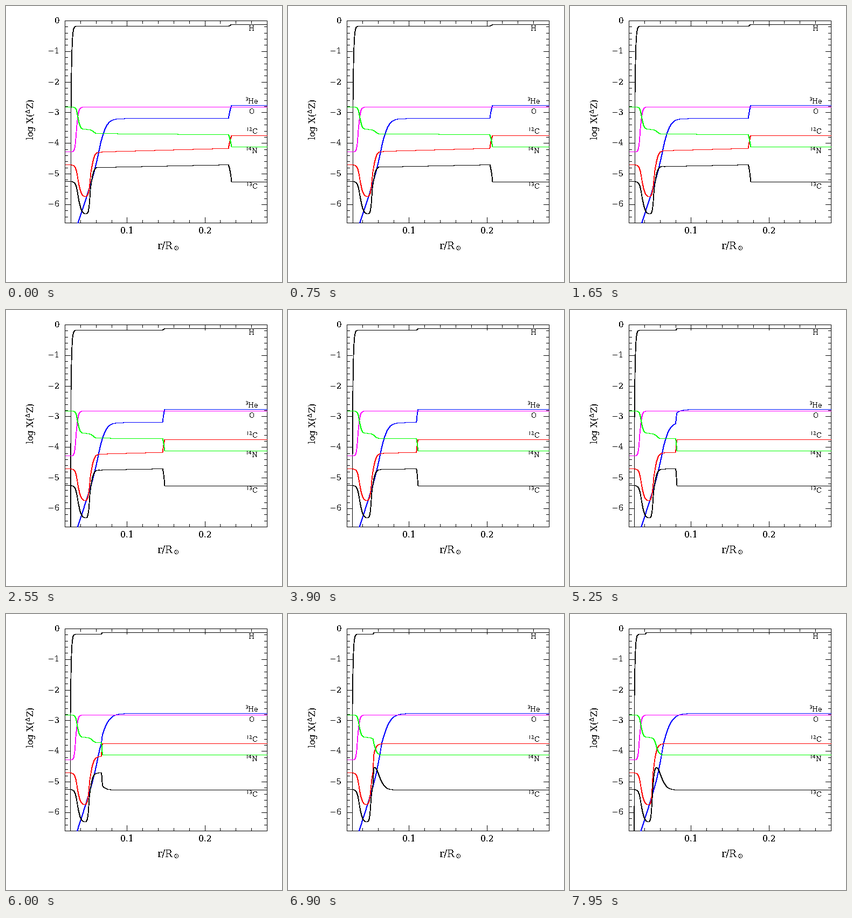
A matplotlib script for the animation above (8 s loop, 512 by 512 pixels).

```python
import numpy as np
import matplotlib.pyplot as plt
from matplotlib.animation import FuncAnimation
from matplotlib.patches import Rectangle

SIZE, DPI = 512, 100
PX = 72 / DPI
LEFT, RIGHT, TOP, BOTTOM = 109, 484, 27, 402
X_UNIT = (RIGHT - LEFT) / 0.26
Y_UNIT = (BOTTOM - TOP) / 6.6
CENTRE = LEFT - 0.02 * X_UNIT          # pixel column of r = 0
STEPS, TICK_MS, TICKS_PER_STEP = 54, 50, 3

plt.rcParams.update({"font.family": "DejaVu Serif",
                     "mathtext.fontset": "dejavuserif",
                     "text.antialiased": False})

xs = np.arange(LEFT + 1, RIGHT + 1)


def rise(u, mid, w_left, w_right):
    """Skewed logistic from 0 to 1 with its own width on each side."""
    d = u - mid
    z = np.where(d < 0, d / w_left, d / w_right)
    return 1 / (1 + np.exp(-np.clip(z, -50, 50)))


# Each profile gives the pixel rows (inside, outside) of the jump.
def hydrogen(u):
    wall = np.exp(np.clip(12 * (120 - u), -50, 8))
    return 37 + 158 * np.exp((120 - u) / 1.45) + wall, np.full(len(u), 34.0)


def helium3(u):
    core = 3 * 4 * np.log1p(np.exp((170 - u) / 4))
    return (208.4 + core + 82.5 * (1 - rise(u, 175.4, 5.2, 6.5)),
            184 + core + 107 * (1 - rise(u, 176.3, 5.2, 8.5)))


def oxygen(u):
    y = 270.3 - 83.3 * rise(u, 130.2, 1.4, 2)
    return y, y


def carbon12(u):
    core = 294.2 + 60 * rise(u, 133.5, 2.3, 3)
    return (core - 90.7 * rise(u, 156.8, 1.9, 3.6),
            core - 114.2 * rise(u, 155.9, 1.3, 3.5))


def nitrogen14(u):
    core = 187 + 41.4 * rise(u, 133.2, 1.7, 2.2)
    return (core + 10 * rise(u, 162, 3, 2.4),
            core + 32.6 * rise(u, 162.6, 2.4, 2.7))


def carbon13(u):
    core = 325 + 61 * rise(u, 133.8, 2.4, 3)
    return (core - 92 * rise(u, 156, 1.4, 3.1),
            core - 110 * rise(u, 155.1, 1.4, 2) + 50 * rise(u, 171.8, 4.5, 5.5))


# profile, colour, tilt of the inner plateau
SPECIES = [(hydrogen, "black", 0), (helium3, "blue", 0), (oxygen, "magenta", 0),
           (carbon12, "red", 0.028), (nitrogen14, "lime", -0.009),
           (carbon13, "black", 0.021)]


def abundance(y):
    return 10 ** ((TOP - y) / Y_UNIT)


def jump_edge(n):
    """Outer edge of the jump: a decay towards r = 0 that slowly speeds up."""
    rate = 0.0235 + 0.000207 * n - 1.35e-8 * n ** 3
    return CENTRE + 337.85 * np.exp(-rate * n)


def curve(profile, tilt, n):
    edge = jump_edge(n)
    width = 0.017 * (edge - CENTRE)
    shrink = 1 - 0.035 * n / (STEPS - 1)
    inner, outer = profile(CENTRE + (xs - CENTRE) / shrink)
    slope = tilt * np.maximum(edge - np.maximum(xs, 175), 0)
    inner = inner + slope * np.interp(xs, [155, 175], [0, 1])
    mix = np.clip((xs - edge + width) / width, 0, 1)
    blend = (1 - mix) * abundance(inner) + mix * abundance(outer)
    return np.round(TOP - Y_UNIT * np.log10(blend))


fig = plt.figure(figsize=(SIZE / DPI, SIZE / DPI), dpi=DPI, facecolor="white")
ax = fig.add_axes([0, 0, 1, 1])
ax.set(xlim=(-0.5, SIZE - 0.5), ylim=(SIZE - 0.5, -0.5))
ax.axis("off")


def stroke(x, y, color="black", width=1.0):
    return ax.plot(x, y, color=color, lw=width * PX, antialiased=False,
                   snap=False)[0]


def label(x, y, text, size, **kw):
    ax.text(x, y, text, fontsize=size * PX, **{"va": "baseline", **kw})


def draw_axes():
    stroke([LEFT, RIGHT, RIGHT, LEFT, LEFT], [TOP, TOP, BOTTOM, BOTTOM, TOP])
    for i in range(2, 14):
        x = round(CENTRE + 0.02 * i * X_UNIT)
        size = 5 if i % 5 else 10
        stroke([x, x], [TOP, TOP + size])
        stroke([x, x], [BOTTOM, BOTTOM - size])
        if i % 5 == 0:
            label(x, 422, f"{0.02 * i:.1f}", 15.5, ha="center")
    for i in range(33):
        y = round(TOP + 0.2 * i * Y_UNIT)
        size = 5 if i % 5 else 10
        stroke([LEFT, LEFT + size], [y, y])
        stroke([RIGHT, RIGHT - size], [y, y])
        if i % 5 == 0:
            text = f"\N{MINUS SIGN}{i // 5}" if i else "0"
            label(99, y + 4, text, 15, ha="right")
    label(279.5, 450, r"r/R$_\odot$", 18)
    label(46, 210, r"log X($^\Delta$Z)", 16.3, rotation=90,
          ha="center", va="center")
    for row, name in [(46, "H"), (182, "$^{3}$He"), (199, "O"),
                      (237, "$^{12}$C"), (274, "$^{14}$N"), (339, "$^{13}$C")]:
        label(455.5, row, name, 12.4, ha="center")


draw_axes()
window = Rectangle((LEFT, TOP), RIGHT - LEFT, BOTTOM - TOP,
                   transform=ax.transData)
lines = [stroke([], [], color, 0.8) for _, color, _ in SPECIES]
for line in lines:
    line.set_clip_path(window)


def update(tick):
    n = tick // TICKS_PER_STEP
    for line, (profile, _, tilt) in zip(lines, SPECIES):
        line.set_data(xs, curve(profile, tilt, n))
    return lines


anim = FuncAnimation(fig, update, frames=160, interval=TICK_MS,
                     repeat=True, repeat_delay=0)
plt.show()
```
